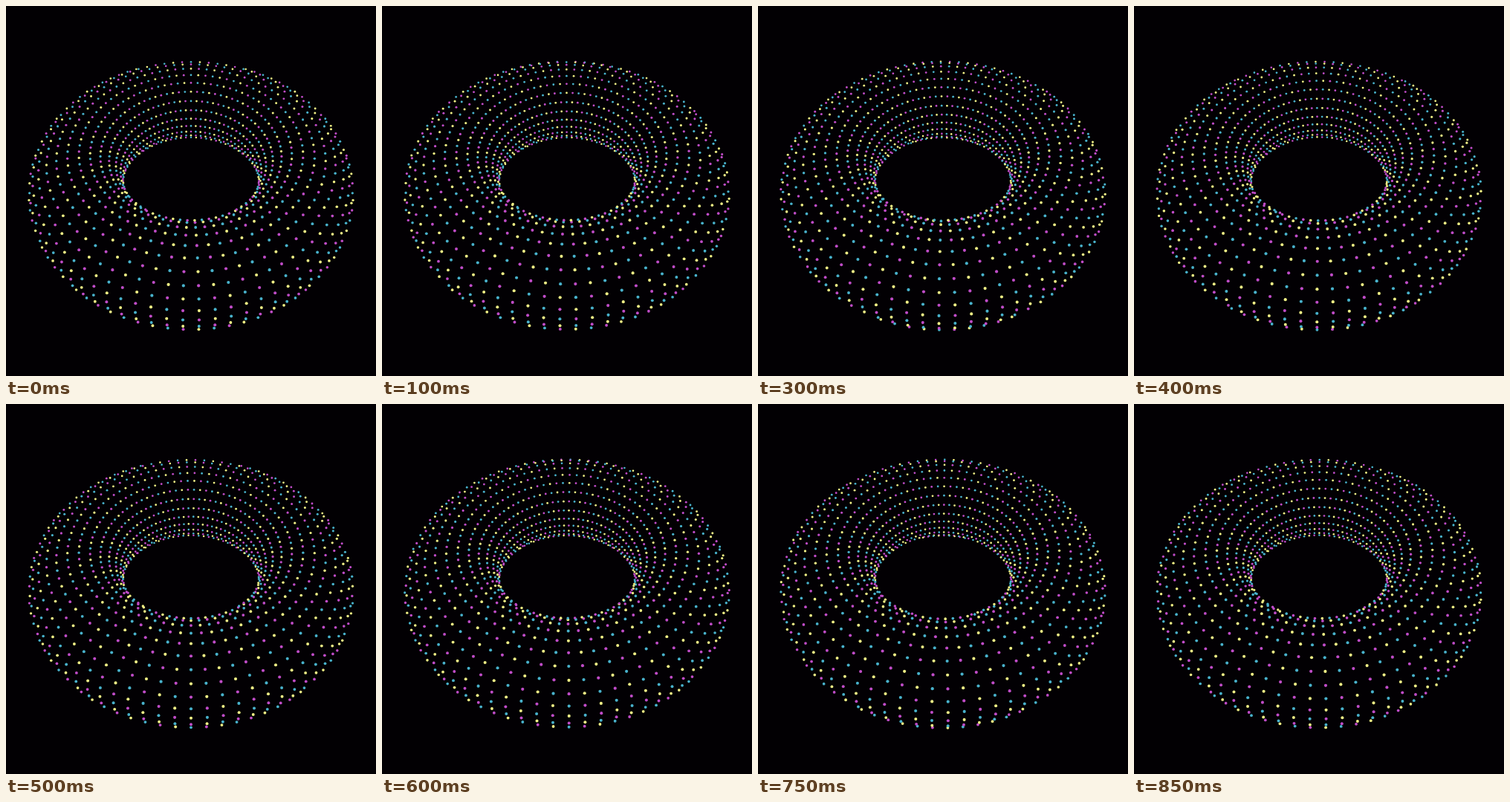
Write an HTML page with a canvas that moves like this. It is 498 by 498 pixels and loops after 0.9 s.

```html
<!DOCTYPE html>
<html lang="en">
<head>
<meta charset="utf-8">
<title>Dotted torus</title>
<style>
html, body { margin: 0; width: 100%; height: 100%; overflow: hidden; background: #020003; }
canvas { display: block; }
</style>
</head>
<body>
<canvas id="stage" width="498" height="498"></canvas>
<script>
const ctx = document.getElementById('stage').getContext('2d');

const SIZE = 498;
const LOOP = 900, STEP = 50;
const FOCAL = 514;
const TAU = Math.PI * 2;

// Lengths are in units of the tube radius; camera space has y down and z away.
const RING = 2.56;
const CENTER = { y: -0.4535, z: 8.79 };
const TILT = 38.32 * Math.PI / 180;
const COS = Math.cos(TILT), SIN = Math.sin(TILT);

const COLUMNS = 81, ROWS = 28;
const FIRST_ROW = -11;           // the colour seam stays on the hidden underside
const LAT_START = 65.4 * Math.PI / 180;
const DOT = 0.0255;
const COLORS = ['#f0f086', '#48b2cc', '#c04cc8'];

// Turns a ring-plane vector (outward length, longitude, height) into camera space.
function toCamera(out, lon, height) {
  const front = out * Math.cos(lon);
  return {
    x: out * Math.sin(lon),
    y: front * COS - height * SIN,
    z: -front * SIN - height * COS
  };
}

function drawDot(lon, lat, color) {
  const n = toCamera(Math.cos(lat), lon, Math.sin(lat));
  const p = toCamera(RING + Math.cos(lat), lon, Math.sin(lat));
  p.y += CENTER.y;
  p.z += CENTER.z;

  // Beads just past the horizon still peek out.
  const facing = -(n.x * p.x + n.y * p.y + n.z * p.z) / Math.hypot(p.x, p.y, p.z);
  if (facing < -0.05) return;

  const scale = FOCAL / p.z;
  ctx.fillStyle = color;
  ctx.beginPath();
  ctx.arc(SIZE / 2 + p.x * scale, SIZE / 2 + p.y * scale, DOT * scale, 0, TAU);
  ctx.fill();
}

// The loop starts at half speed, then runs evenly.
function progressAt(time) {
  const step = Math.floor((time % LOOP) / STEP);
  return Math.max(step / 2, step - 2) / 16;
}

function draw(time) {
  const progress = progressAt(time);
  ctx.fillStyle = '#020003';
  ctx.fillRect(0, 0, SIZE, SIZE);

  // One loop turns the torus by one column and rolls the tube by two rows.
  for (let i = 0; i < COLUMNS; i++) {
    const lon = (i + 0.5 + progress) * TAU / COLUMNS;
    for (let j = FIRST_ROW; j < FIRST_ROW + ROWS; j++) {
      const lat = LAT_START + (j + 2 * progress) * TAU / ROWS;
      drawDot(lon, lat, COLORS[(i + j + 12) % 3]);
    }
  }
}

const start = performance.now();
function frame() {
  draw(performance.now() - start);
  requestAnimationFrame(frame);
}
frame();
</script>
</body>
</html>
```
